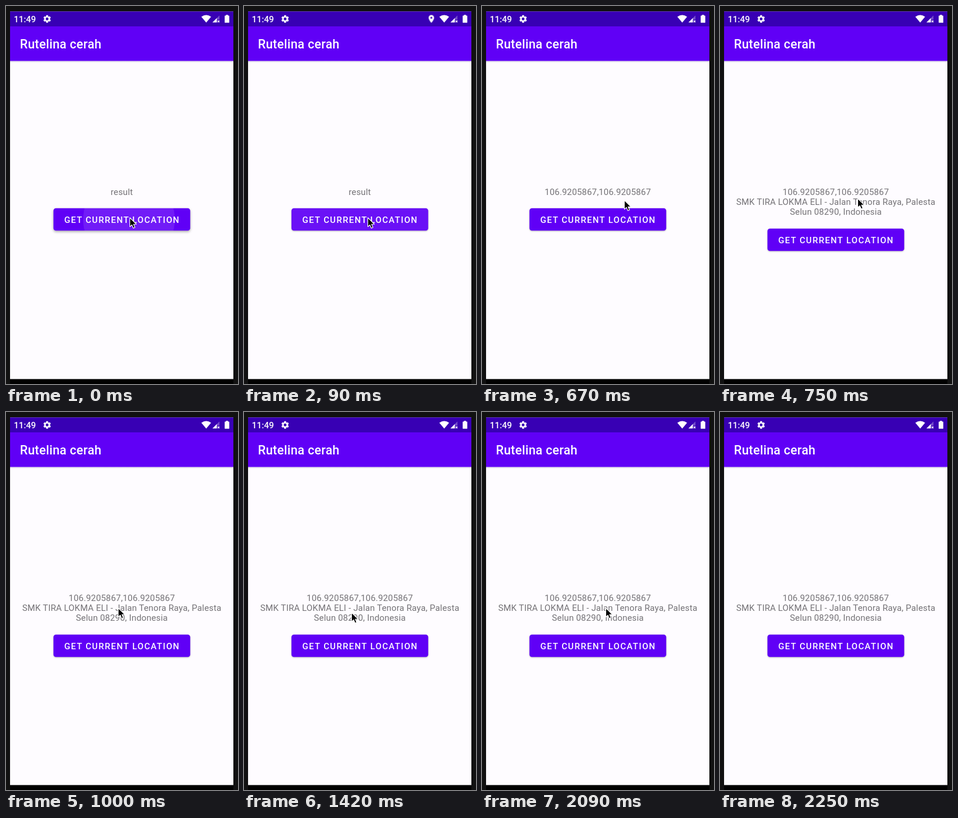
Animation of 400 by 650 pixels, one loop 2.75 s. Source, as an HTML page:

```html
<!DOCTYPE html>
<html lang="id">
<head>
<meta charset="utf-8">
<title>Current location</title>
<style>
  html, body { margin: 0; width: 100%; height: 100%; overflow: hidden; background: #111; }
  svg { display: block; width: 400px; height: 650px; font-family: Roboto, sans-serif; }
  .medium { font-weight: 500; fill: #fff; }
  .result { font-size: 14.98px; letter-spacing: .0118em; fill: #747276; text-anchor: middle; }
  .label { font-size: 14.98px; letter-spacing: .092em; text-anchor: middle; }
  .title { font-size: 21.4px; letter-spacing: .0125em; }
  .clock { font-size: 15px; }

  .result, .pin, .button, .face, .ripple, .cursor { animation: 2750ms step-end infinite; }
  .waiting { animation-name: waiting; }
  .coords { animation-name: coords; }
  .address { animation-name: address; }
  .pin { animation-name: pin; }
  .button { animation-name: drop; }
  .face { animation-name: lift; }
  .ripple { animation-name: ripple; }
  .cursor { animation-name: pointer; }

  @keyframes waiting { 0% { opacity: 1 } 9.09%, 100% { opacity: 0 } }
  @keyframes coords { 0% { opacity: 0 } 9.09%, 100% { opacity: 1 } }
  @keyframes address { 0% { opacity: 0 } 27.27%, 100% { opacity: 1 } }
  @keyframes pin { 0% { opacity: 0 } 3.27% { opacity: 1 } 9.09%, 100% { opacity: 0 } }
  @keyframes drop { 0% { transform: none } 27.27%, 100% { transform: translateY(35px) } }
  @keyframes lift {
    0% { filter: drop-shadow(0 2px 2px #0005) }
    3.27%, 100% { filter: drop-shadow(0 1px 1px #0004) }
  }
  @keyframes ripple {
    0% { r: 79px; opacity: .11 }
    3.27% { r: 134px; opacity: .07 }
    9.09% { r: 134px; opacity: .01 }
    12.36%, 100% { r: 134px; opacity: 0 }
  }
  @keyframes pointer {
    0% { transform: translate(214px, 365px) }
    21.45% { transform: translate(232px, 346px) }
    24.36% { transform: translate(246px, 335px) }
    27.27% { transform: translate(238px, 332px) }
    30.54% { transform: translate(222px, 332px) }
    33.45% { transform: translate(207px, 334px) }
    36.36% { transform: translate(194px, 338px) }
    39.63% { transform: translate(184px, 341px) }
    51.63% { transform: translate(186px, 346px) }
    54.54% { transform: translate(191px, 356px) }
    57.81% { transform: translate(196px, 364px) }
    60.72% { transform: translate(199.5px, 368px) }
    76% { transform: translate(214px, 338px) }
    78.9% { transform: translate(254px, 250px) }
    81.81%, 100% { transform: translate(-50px, 0) }
  }
</style>
</head>
<body>
<svg viewBox="0 0 400 650">
  <defs>
    <clipPath id="face"><rect x="81.8" y="347.7" width="235.8" height="38.5" rx="4.3"/></clipPath>
    <linearGradient id="shade" x2="0" y2="1">
      <stop stop-color="#50407a" stop-opacity=".25"/>
      <stop offset="1" stop-color="#50407a" stop-opacity="0"/>
    </linearGradient>
  </defs>

  <rect width="400" height="650" fill="#111"/>
  <rect x="7" y="641" width="385" height="9" fill="#000"/>
  <rect x="7" y="9.3" width="385" height="632.2" fill="#fefcff"/>
  <rect x="7" y="94.5" width="385" height="3" fill="url(#shade)"/>
  <rect x="7" y="35" width="385" height="59.5" fill="#6000f6"/>
  <rect x="7" y="9.3" width="385" height="25.7" fill="#3800b4"/>

  <text class="medium clock" x="13.4" y="27.6">11:49</text>
  <text class="medium title" x="24" y="73">Rutelina cerah</text>

  <g fill="#fff">
    <path transform="translate(62.8 14.2) scale(.675)" d="M19.14 12.94c.04-.3.06-.61.06-.94 0-.32-.02-.64-.07-.94l2.03-1.58c.18-.14.23-.41.12-.61l-1.92-3.32c-.12-.22-.37-.29-.59-.22l-2.39.96c-.5-.38-1.03-.7-1.62-.94l-.36-2.54c-.04-.24-.24-.41-.48-.41h-3.84c-.24 0-.43.17-.47.41l-.36 2.54c-.59.24-1.13.57-1.62.94l-2.39-.96c-.22-.08-.47 0-.59.22L2.74 8.87c-.12.21-.08.47.12.61l2.03 1.58c-.05.3-.09.63-.09.94s.02.64.07.94l-2.03 1.58c-.18.14-.23.41-.12.61l1.92 3.32c.12.22.37.29.59.22l2.39-.96c.5.38 1.03.7 1.62.94l.36 2.54c.05.24.24.41.48.41h3.84c.24 0 .44-.17.47-.41l.36-2.54c.59-.24 1.13-.56 1.62-.94l2.39.96c.22.08.47 0 .59-.22l1.92-3.32c.12-.22.07-.47-.12-.61l-2.01-1.58zM12 15.6a3.6 3.6 0 1 1 0-7.2 3.6 3.6 0 0 1 0 7.2z"/>
    <path class="pin" transform="translate(315 14.2) scale(.67)" d="M12 2C8.13 2 5 5.13 5 9c0 5.25 7 13 7 13s7-7.75 7-13c0-3.87-3.13-7-7-7zm0 9.5a2.5 2.5 0 1 1 0-5 2.5 2.5 0 0 1 0 5z"/>
    <path d="M345.2 28.6 336.8 18.4Q345.2 12.6 353.6 18.4Z"/>
    <path d="M356 28.3 368 16.3V23.5H363.5V28.3Z" opacity=".3"/>
    <path d="M356 28.3 363.5 20.8V28.3Z"/>
    <path d="M364.8 24.8l3.2 3.2m0-3.2l-3.2 3.2" stroke="#fff" stroke-width="1.1"/>
    <path d="M379.2 15.2h3.6v1.4h1.3q.9 0 .9.9v10.4q0 .9-.9.9h-6.2q-.9 0-.9-.9V17.5q0-.9.9-.9h1.3z"/>
  </g>

  <text class="result waiting" x="199.7" y="324.6">result</text>
  <text class="result coords" x="199.7" y="324.6">106.9205867,106.9205867</text>
  <text class="result address" y="342"><tspan x="199.7">SMK TIRA LOKMA ELI - Jalan Tenora Raya, Palesta</tspan><tspan x="199.7" dy="17.4">Selun 08290, Indonesia</tspan></text>

  <g class="button">
    <rect class="face" x="81.8" y="347.7" width="235.8" height="38.5" rx="4.3" fill="#6000f6"/>
    <g clip-path="url(#face)"><circle class="ripple" cx="212" cy="367" r="79" fill="#fff"/></g>
    <text class="medium label" x="200.2" y="372.5">GET CURRENT LOCATION</text>
  </g>

  <path class="cursor" d="m-.5-1v15.5l3.5-3.2 2.5 5.7 2.8-1.2-2.4-5.6h4.8z" fill="#000" stroke="#fff" stroke-width="1.1" stroke-linejoin="round"/>
</svg>
</body>
</html>
```
